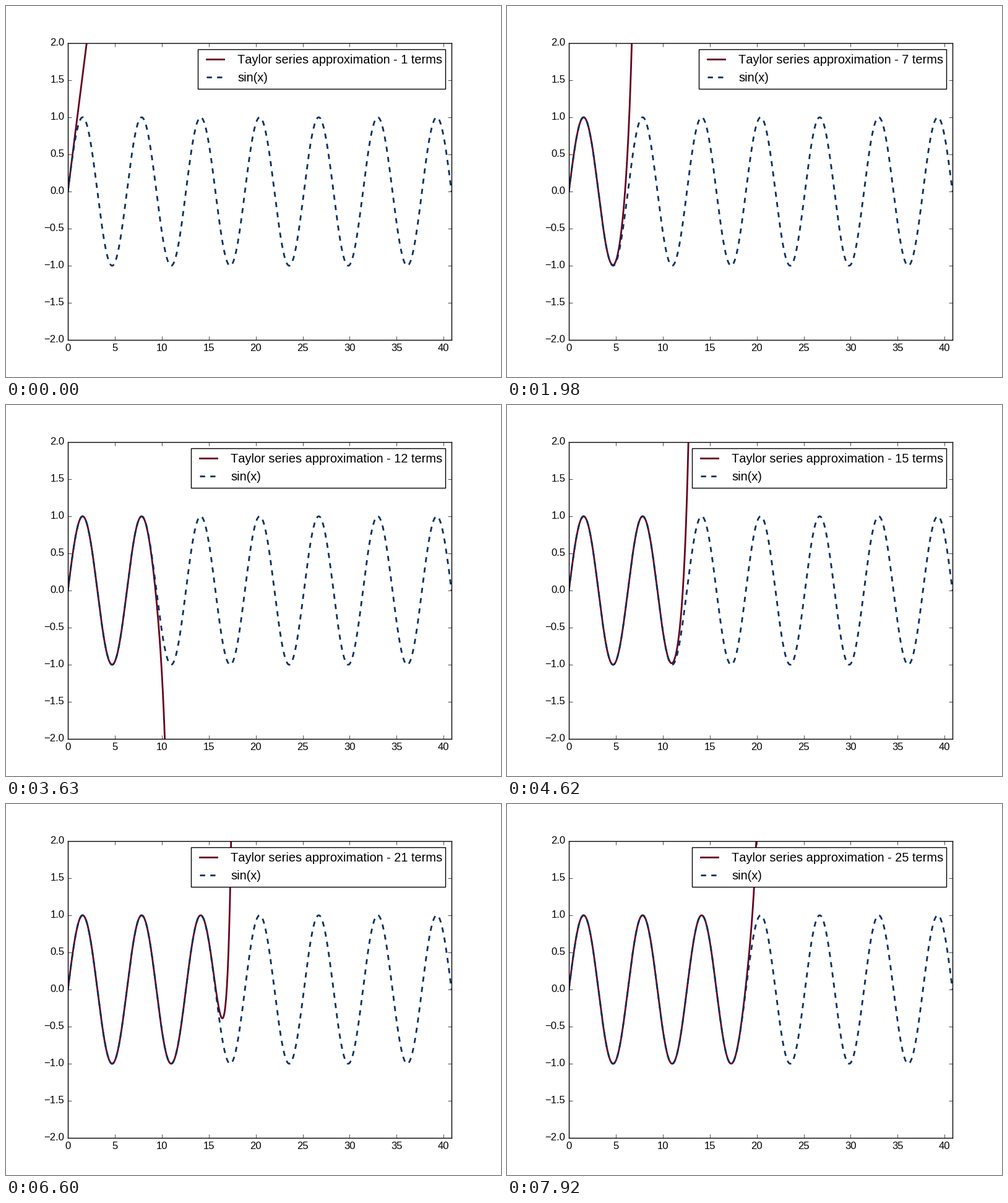
A matplotlib script for the animation above (8000 ms loop, 800 by 600 pixels).

```python
import math

import numpy as np
import matplotlib.pyplot as plt
from matplotlib.animation import FuncAnimation
from matplotlib.lines import Line2D
from matplotlib.patches import Rectangle
from matplotlib.transforms import IdentityTransform

plt.rcParams.update({
    "font.family": "Liberation Sans",
    "font.size": 12,
    "text.kerning_factor": 6,
    "text.hinting": "force_autohint",
    "text.hinting_factor": 8,
    "axes.linewidth": 1.0,
    "ytick.alignment": "center",
    "lines.solid_capstyle": "projecting",
    "lines.linewidth": 2,
})

STEP = 20      # ms per drawn frame
LOOP = 8000    # ms per loop
HOLD = 330     # ms for each number of terms
RED, BLUE = "#67001f", "#053061"
DASHED = dict(color=BLUE, ls=(0, (3, 3)), dash_capstyle="butt")

x = np.linspace(0, 13 * math.pi, 1000)


def partial_sums(count):
    """Sums of the sine series with 1 to count terms."""
    term, total, sums = x.copy(), np.zeros_like(x), []
    for k in range(1, count + 1):
        total = total + term
        sums.append(np.clip(total, -1e4, 1e4))
        term = -term * x**2 / (2 * k * (2 * k + 1))
    return sums


curves = partial_sums(LOOP // HOLD + 1)

fig = plt.figure(figsize=(8, 6), dpi=100, facecolor="white")
ax = fig.add_axes([0.125, 0.1, 0.775, 0.8])
ax.set(xlim=(0, x[-1]), ylim=(-2, 2),
       xticks=range(0, 41, 5), yticks=np.arange(-2, 2.1, 0.5))
ax.tick_params(direction="in", length=4, width=0.5, pad=4,
               top=True, right=True)
approx, = ax.plot(x, curves[0], color=RED)
ax.plot(x, np.sin(x), **DASHED)

# Legend, laid out in pixels from the bottom left
pixels = dict(transform=IdentityTransform())
RIGHT, TOP, BOTTOM = 710, 530, 466
BASELINES = 507, 478

box = Rectangle((310, BOTTOM), 400, TOP - BOTTOM, fc="white", ec="black",
                lw=1, zorder=5, **pixels)
keys = [Line2D([], [], color=RED, zorder=6, **pixels),
        Line2D([], [], zorder=6, **DASHED, **pixels)]
for artist in [box, *keys]:
    fig.add_artist(artist)
labels = [fig.text(0, y, "sin(x)", size=14.4, va="baseline", zorder=6, **pixels)
          for y in BASELINES]


def update(i):
    n = (i * STEP + STEP // 2) // HOLD + 1
    approx.set_ydata(curves[n - 1])
    left = 310 if n < 10 else 299
    box.set_x(left)
    box.set_width(RIGHT - left)
    for key, label, y in zip(keys, labels, BASELINES):
        key.set_data([left + 14, left + 42], [y + 7, y + 7])
        label.set_x(left + 64)
    labels[0].set_text(f"Taylor series approximation - {n} terms")
    return [approx, box, *keys, *labels]


anim = FuncAnimation(fig, update, frames=LOOP // STEP, interval=STEP,
                     init_func=lambda: update(0), repeat=True, repeat_delay=0)
plt.show()
```
